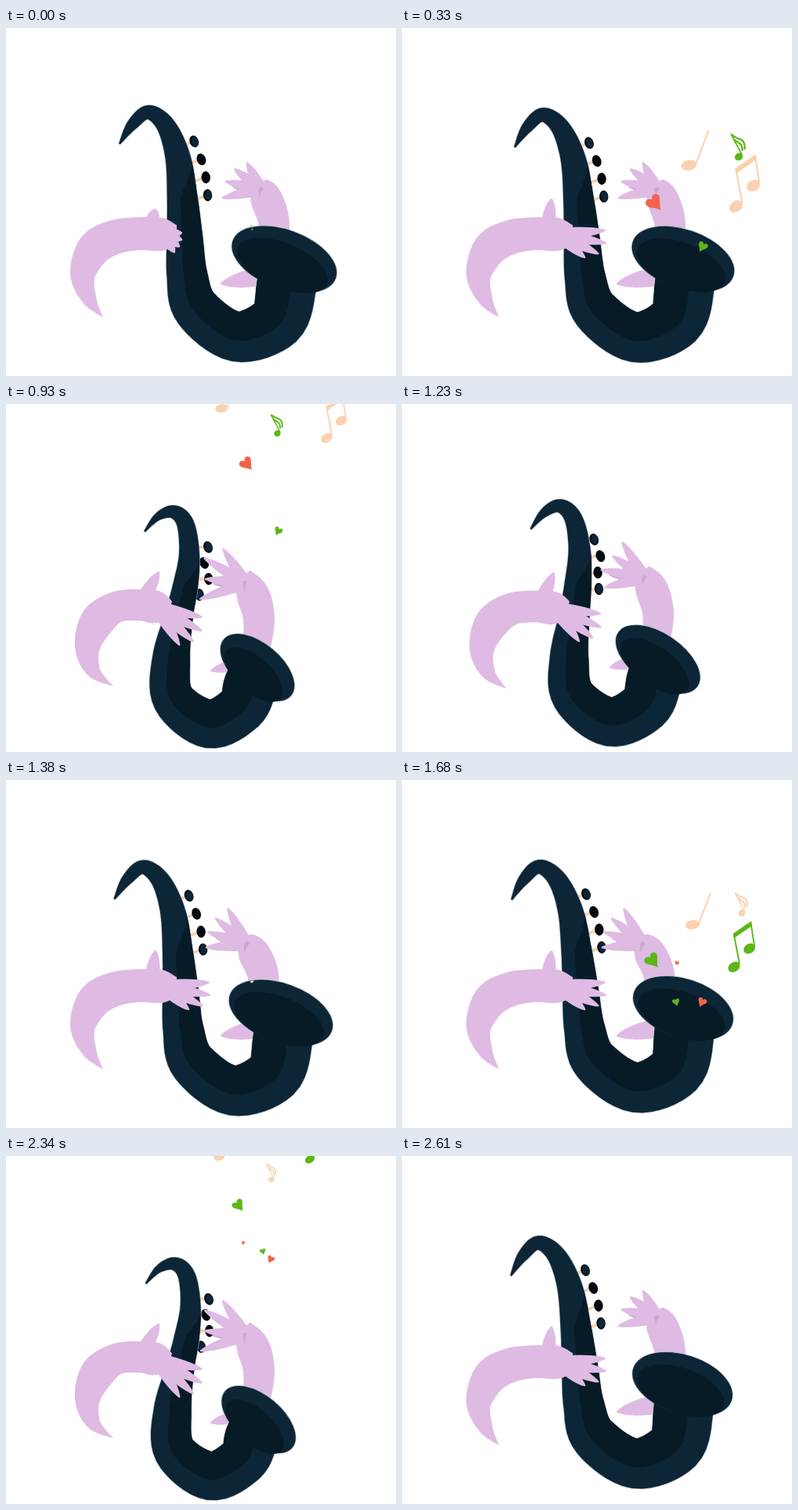
An HTML page for the animation above (2670 ms loop, 498 by 445 pixels).

```html
<!DOCTYPE html>
<html lang="en">
<head>
<meta charset="utf-8">
<title>Saxophone</title>
<style>
html, body { margin: 0; width: 100%; height: 100%; overflow: hidden; background: #fff; }
svg { display: block; width: 100%; height: 100%; }
</style>
</head>
<body>
<svg id="stage" viewBox="0 0 498 445"></svg>
<script>
const LOOP = 2670;
const NAVY = '#0c2638', DARK = '#071b27', PINK = '#dfbbe4', SHADE = '#cba9cf';
const PEACH = '#fbd1b0', GREEN = '#5bb715', RED = '#f0644a';

const lerp = (a, b, k) => a + (b - a) * k;
const mix = (a, b, k) => a.map((v, i) => Array.isArray(v) ? mix(v, b[i], k) : lerp(v, b[i], k));
const clamp = k => Math.min(1, Math.max(0, k));
const smooth = k => (k = clamp(k)) * k * (3 - 2 * k);
const pulse = (t, a, b, c, d) => smooth((t - a) / (b - a)) * (1 - smooth((t - c) / (d - c)));
const polar = ([x, y], deg, len) => {
  const a = deg * Math.PI / 180;
  return [x + Math.cos(a) * len, y + Math.sin(a) * len];
};
const xy = p => p[0].toFixed(1) + ' ' + p[1].toFixed(1);
const path = (d, fill, extra = '') => `<path d="${d}" fill="${fill}" ${extra}/>`;
const oval = ([x, y, rx, ry, turn], fill, extra = '') =>
  `<ellipse rx="${rx}" ry="${ry}" transform="translate(${xy([x, y])}) rotate(${turn})" fill="${fill}" ${extra}/>`;

// Catmull-Rom value of node list p at position u
function along(p, u) {
  const i = Math.min(p.length - 2, Math.floor(u)), k = u - i;
  const b = p[i], c = p[i + 1], a = p[i - 1] || b, d = p[i + 2] || c;
  return b.map((v, j) => v + k / 2 * (c[j] - a[j]
    + k * (2 * a[j] - 5 * v + 4 * c[j] - d[j] + k * (3 * (v - c[j]) + d[j] - a[j]))));
}

// outline of a tapering tube; near and far place its two sides across the width
function tube(spine, near = () => -1, far = () => 1) {
  const left = [], right = [], end = spine.length - 1;
  for (let u = 0; u <= end + .001; u += .125) {
    const s = Math.min(u, end), [x, y, r] = along(spine, s);
    const p = along(spine, Math.max(0, s - .05)), q = along(spine, Math.min(end, s + .05));
    const dx = q[0] - p[0], dy = q[1] - p[1], len = Math.hypot(dx, dy) || 1;
    const side = f => [x + dy / len * r * f, y - dx / len * r * f];
    left.push(side(near(s)));
    right.unshift(side(far(s)));
  }
  return 'M' + [...left, ...right].map(xy).join('L') + 'Z';
}

function finger(b, t, w, color = PINK) {
  const dx = t[0] - b[0], dy = t[1] - b[1], len = Math.hypot(dx, dy) || 1;
  const edge = (k, f) => xy([b[0] + dx * k - dy / len * w * f, b[1] + dy * k + dx / len * w * f]);
  const d = `M${edge(0, 1)}Q${edge(.7, .85)} ${xy(t)}Q${edge(.7, -.85)} ${edge(0, -1)}Z`;
  return path(d, color, `stroke="${color}" stroke-width="2.4" stroke-linejoin="round"`);
}

// spine nodes [x, y, radius], from mouthpiece to bell
const UPRIGHT = [[139, 153, 1], [154, 128, 7], [174, 111, 9], [197, 127, 12], [214, 167, 16], [222, 220, 19.5],
  [227, 270, 23], [232, 318, 26], [246, 360, 30], [297, 393, 32], [348, 372, 36], [359, 328, 38], [358, 305, 37]];
const LEANING = [[177, 163, 1], [194, 144, 5], [214, 138, 8.5], [229, 153, 11], [234, 192, 13], [229, 233, 16],
  [221, 270, 18], [211, 325, 24], [214, 377, 27], [259, 409, 31], [300, 389, 32], [312, 360, 34], [318, 345, 33]];

// ellipses: x, y, rx, ry, turn
const BELL = [[358, 292, 66, 37.5, 18], [321, 337, 56, 30.5, 40]];
const MOUTH = [[356, 300, 58, 29, 20], [316, 346, 46, 22.5, 42]];

const ARM = [
  [[124, 370, 0], [107, 348, 9], [98, 316, 16], [112, 283, 22], [137, 268, 22], [169, 263, 21], [200, 264, 21], [218, 264, 12]],
  [[137, 361, 0], [112, 342, 9], [104, 312, 16], [116, 279, 22], [140, 260, 20], [170, 257, 20], [192, 260, 21], [208, 265, 13]]];
const HAND = {
  open: [[340, 285, 18], [342, 248, 20], [331, 215, 20], [322, 200, 12]],
  near: [[328, 285, 18], [328, 248, 20], [315, 219, 20], [303, 205, 12]],
  play: [[320, 310, 18], [323, 275, 20], [315, 243, 21], [301, 220, 13]]
};

// time, turn, dx, dy
const SWAY = [[0, .04, -4, 1.5], [630, 0, 4, 3], [930, 0, 0, 0], [1380, .03, -8, 4],
  [1680, 0, 1, 0], [2040, 0, 3, 0], [LOOP, 0, 0, 0]];

function sway(t) {
  const i = SWAY.findIndex(row => row[0] > t);
  const a = SWAY[i - 1], b = SWAY[i];
  return mix(a, b, smooth((t - a[0]) / (b[0] - a[0]))).slice(1);
}

function pose(t) {
  const lean = pulse(t, 540, 930, 1140, 1380) + pulse(t, 1700, 2040, 2350, 2610);
  const beat = t / 370 - 1.51;
  return {
    lean,
    near: pulse(t, 1100, 1380, 1700, 2040),
    curl: 1 - smooth(t / 300),
    press: [0, 1, 2, 3].map(i => lean * (.5 + .5 * Math.cos(Math.PI * (i + beat))))
  };
}

function sax(t, { lean, press }) {
  const [turn, dx, dy] = sway(t), c = Math.cos(turn), s = Math.sin(turn);
  const move = ([x, y, ...rest]) =>
    [300 + (x - 300) * c - (y - 400) * s + dx, 400 + (x - 300) * s + (y - 400) * c + dy, ...rest];
  const spine = mix(UPRIGHT, LEANING, lean).map(move);
  const flare = ([a, b]) => {
    const [x, y, rx, ry, deg] = move(mix(a, b, lean));
    return [x - 75 * turn, y, rx * (1 + 1.5 * turn), ry, deg + turn * 57];
  };
  const body = tube(spine), bell = flare(BELL);
  const stripe = tube(spine, () => 1, u => 1 - 1.16 * smooth(u - 4.1));
  const rim = 'stroke="#a9b4b9" stroke-width="1.4" stroke-linejoin="round"';

  const keys = press.map((down, i) => {
    const k = i / 3, bow = 4 * Math.sin(Math.PI * k);
    const ends = mix([234, 146, 254, 214], [258, 183, 254, 244], lean);
    const [x, y] = move([lerp(ends[0], ends[2], k) + bow, lerp(ends[1], ends[3], k)]);
    const at = [x - 7 * down, y], tilt = i < 2 ? -20 : -5;
    return `<path d="M${xy([x - 15, y + 5 * (1 - lean)])}L${xy(at)}" stroke="${PEACH}" stroke-width="4"/>`
      + oval([...at, 5.7, 7.7, tilt], '#02080d')
      + (i % 3 ? '' : oval([at[0] + .8, at[1], 4.3, 6.3, tilt], NAVY));
  }).join('');

  const horn = path(body, NAVY, rim) + oval(bell, NAVY, rim) + path(body, NAVY)
    + path(stripe, DARK) + oval(bell, NAVY) + oval(flare(MOUTH), DARK);
  return { keys, horn };
}

function leftArm({ lean, curl }) {
  const spine = mix(ARM[0], ARM[1], lean), palm = spine[6];
  let out = path(tube(spine), PINK);
  out += finger([palm[0] - 13, palm[1] - 17], [palm[0] - 9 + 12 * lean, palm[1] - 45 + 13 * curl], 8);
  for (let i = 0; i < 4; i++) {
    const len = 61 - 3.5 * (i - .8) ** 2 + 4 * i * lean;
    const tip = polar(palm, -5 + 15.5 * i + 17 * lean + 5 * i * curl, lerp(len, 24 + i, curl));
    out += finger(mix([palm[0], palm[1]], tip, .12), tip, 7);
  }
  return out;
}

function rightArm({ lean, near, press }) {
  const spine = mix(mix(HAND.open, HAND.near, near), HAND.play, lean);
  const palm = mix(spine[2], spine[3], .6).slice(0, 2);
  const reach = Math.max(near, lean);
  const tips = press.map((down, i) =>
    polar(palm, 242 - 25 * i - 6 * lean + 3 * i * near, lerp(38 + 4 * i, 52, reach) + 10 * down));
  const low = (tip, k) => mix(palm, tip, k).map((v, j) => v + 3 + 2 * j);
  const tail = mix([322, 318, 275, 327], [294, 333, 262, 341], lean);
  return finger(tail.slice(0, 2), tail.slice(2), lerp(11, 7, lean)) + path(tube(spine), PINK)
    + tips.slice(1, 3).map(p => finger(low(p, .1), low(p, .85), 4, SHADE)).join('')
    + tips.map(p => finger(mix(palm, p, .1), p, 6.5)).join('');
}

const head = (x, y, rx, ry, r) => `<ellipse rx="${rx}" ry="${ry}" transform="translate(${x} ${y}) rotate(${r})"/>`;
const line = (d, w) => `<path d="${d}" fill="none" stroke-width="${w}"/>`;
const SHAPES = {
  quarter: head(0, 0, 14, 9, -10) + line('M12 -2L35 -62', 3),
  double: head(0, 0, 13, 9.5, -35) + head(31, -37, 12.5, 9.5, -30)
    + line('M11 -7L0 -64', 3) + line('M41 -43L34 -88', 3) + '<path d="M-2 -67L35 -93L36 -83L0 -58Z"/>',
  flagged: head(0, 0, 7, 6.3, -35) + line('M5 -4L-13 -38', 2.5)
    + line('M-13 -38Q-4 -31 4 -29Q11 -25 10 -12', 3) + line('M-8 -29Q-2 -25 2 -22Q6 -19 6 -10', 3),
  heart: '<path stroke="none" d="M0 17C-5 5 -15 0 -14 -7C-12 -15 -2 -14 0 -7C2 -14 12 -15 14 -7C15 0 5 5 0 17Z"/>'
};

// kind, colour, place after leaving the bell, place at full size, size, turn
const PHRASES = [
  { start: 0, notes: [
    ['flagged', GREEN, [434, 170], [390, 109], 1.05, 0],
    ['quarter', PEACH, [371, 185], [319, 77], 1, 0],
    ['double', PEACH, [424, 239], [453, 115], 1, 0],
    ['heart', RED, [320, 231], [351, 148], 1, -40],
    ['heart', GREEN, [383, 284], [391, 234], .62, 28]] },
  { start: 1380, notes: [
    ['quarter', PEACH, [371, 185], [320, 80], 1, 0],
    ['flagged', PEACH, [434, 170], [387, 109], 1, 0],
    ['double', GREEN, [424, 239], [436, 83], .96, 0],
    ['heart', GREEN, [320, 231], [345, 142], 1, -38],
    ['heart', RED, [351, 234], [351, 190], .3, 15],
    ['heart', GREEN, [350, 284], [376, 201], .5, -15],
    ['heart', RED, [383, 284], [386, 211], .62, 26]] }];

// notes leave the bell one by one, swell, then drift up to the left and shrink
function drawNote([kind, color, out, full, size, turn], i, age) {
  if (age < 40 * i || age > 1110) return '';
  const [x, y] = age < 300 ? mix([314, 258], out, age / 300)
    : age < 640 ? mix(out, full, (age - 300) / 340)
    : mix(full, [full[0] - 45, full[1] - 74], (age - 640) / 300);
  const s = size * Math.max(.15, Math.sin(Math.PI * age / 1200) ** 1.2);
  return `<g transform="translate(${xy([x, y])}) rotate(${turn}) scale(${s.toFixed(3)})"`
    + ` fill="${color}" stroke="${color}" stroke-width="0">${SHAPES[kind]}</g>`;
}

// the motion advances in alternating holds of 60 and 90 ms
function stepped(t) {
  if (t < 30) return 0;
  if (t >= 2610) return 2610;
  const u = t - 30;
  return 30 + Math.floor(u / 150) * 150 + (u % 150 >= 60 ? 60 : 0);
}

const stage = document.getElementById('stage');
let last = -1;
function draw(now) {
  const t = stepped(now % LOOP);
  if (t === last) return;
  last = t;
  const p = pose(t), { keys, horn } = sax(t, p);
  stage.innerHTML = keys + rightArm(p) + horn + leftArm(p)
    + PHRASES.map(({ start, notes }) => notes.map((n, i) => drawNote(n, i, t - start)).join('')).join('');
}

let origin = null;
function tick(now) {
  if (origin === null) origin = now;
  draw(Math.max(0, now - origin));
  requestAnimationFrame(tick);
}
draw(0);
requestAnimationFrame(tick);
</script>
</body>
</html>
```
